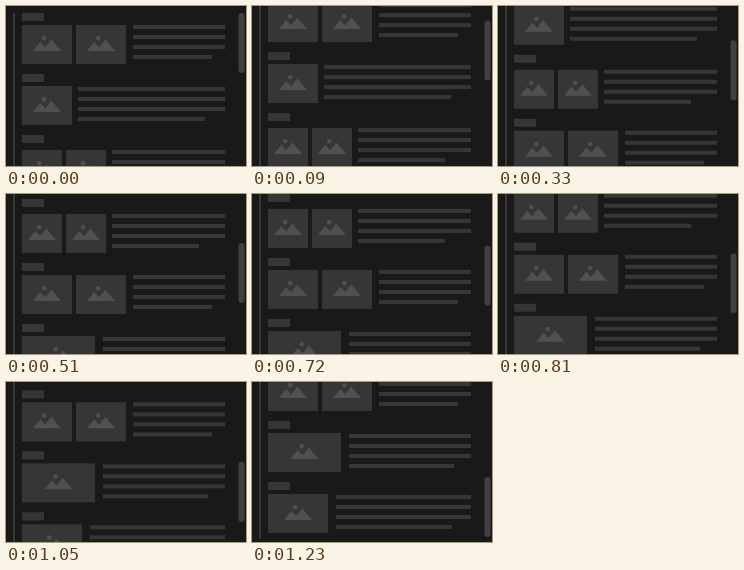
Write an HTML page that moves like this. It is 240 by 160 pixels and loops after 1800 ms.

```html
<!DOCTYPE html>
<html lang="en">
<head>
<meta charset="utf-8">
<title>Scrolling feed</title>
<style>
html, body { margin: 0; width: 100%; height: 100%; overflow: hidden; background: #191919; }
svg { display: block; width: 100vw; height: 100vh; }
</style>
</head>
<body>
<svg viewBox="0 0 240 160">
  <defs>
    <g id="picture" fill="#505050">
      <circle cx="-2.8" cy="13.2" r="2.3"/>
      <path d="M-14 26L-6.8 17L-1.8 22.2L4.4 14.5L14 26Z"/>
    </g>
  </defs>
  <g id="feed" fill="#363636"></g>
  <rect id="thumb" x="232.5" y="7" width="6" height="60" rx="3" fill="#404040"/>
</svg>
<script>
const feed = document.getElementById('feed');
const thumb = document.getElementById('thumb');

const LEFT = 16, RIGHT = 219, GAP = 4, IMAGE_HEIGHT = 39;
const rows = [
  { label: 7, top: 19, count: 2, width: 50, text: 127, end: 206, shift: 0 },
  { label: 68, top: 80, count: 1, width: 50, text: 72, end: 199, shift: 1 },
  { label: 129, top: 144, count: 2, width: 40, text: 106, end: 193, shift: 0 },
  { label: 193, top: 205, count: 2, width: 50, text: 127, end: 206, shift: 0 },
  { label: 254, top: 266, count: 1, width: 73, text: 97, end: 202, shift: 1 },
  { label: 315, top: 327, count: 1, width: 60, text: 84, end: 200, shift: 1 }
];

const rect = (x, y, w, h) => `<rect x="${x}" y="${y}" width="${w}" height="${h}"/>`;

function drawRow({ label, top, count, width, text, end, shift }) {
  let out = rect(LEFT, label, 22, 8);
  for (let i = 0; i < count; i++) {
    const x = LEFT + i * (width + GAP);
    out += rect(x, top, width, IMAGE_HEIGHT);
    out += `<use href="#picture" x="${x + width / 2}" y="${top}"/>`;
  }
  for (let i = 0; i < 4; i++) {
    out += rect(text, top + shift + i * 10, (i < 3 ? RIGHT : end) - text, 4);
  }
  return out;
}

feed.innerHTML = rect(7, 7, 2, 365) + rows.map(drawRow).join('');

const LOOP = 1800, STEP = 30;
const progress = (t, start, end) => Math.min(1, Math.max(0, (t - start) / (end - start)));

// Two linear scrolls with a pause after each, advancing in 30 ms steps.
function draw() {
  const t = Math.floor(performance.now() % LOOP / STEP) * STEP;
  const first = progress(t, 0, 510);
  const second = progress(t, 690, 1230);
  feed.setAttribute('transform', `translate(0 ${-124 * first - 91 * second})`);
  thumb.setAttribute('y', 7 + 42 * first + 46 * second);
  requestAnimationFrame(draw);
}
draw();
</script>
</body>
</html>
```
